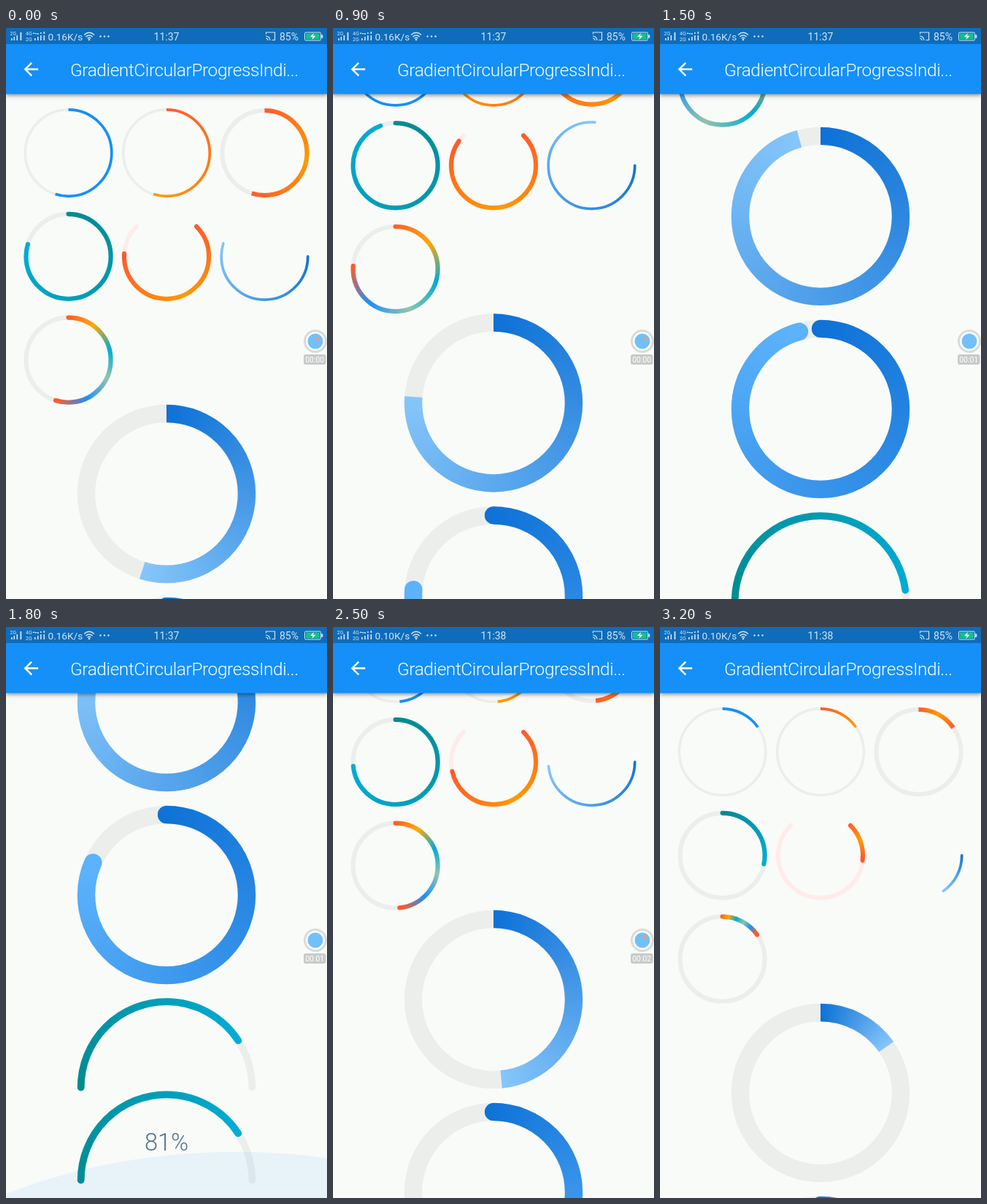
Animation, 440 px wide and 782 px high, one loop 3.3 s. Source, as an HTML page with a canvas:

```html
<!DOCTYPE html>
<html lang="en">
<head>
<meta charset="utf-8">
<title>Gradient circular progress</title>
<style>
  html, body { margin: 0; width: 100%; height: 100%; overflow: hidden; background: #f9fbf9; }
  canvas, svg.ui { position: absolute; left: 0; top: 0; width: 440px; height: 782px; }
  text { font-family: Roboto, sans-serif; }
  .thin { font-weight: 300; }
  #bar { filter: drop-shadow(0 2px 2px rgba(0, 0, 0, .28)) drop-shadow(0 2px 3px rgba(0, 0, 0, .16)); }
</style>
</head>
<body>
<canvas id="stage"></canvas>
<svg class="ui" viewBox="0 0 440 782">
  <text id="percent" class="thin" x="220" text-anchor="middle" font-size="32.6" fill="#4f7489"></text>
  <ellipse id="glow" cx="315" cy="782" fill="#2196f3"/>

  <rect id="bar" width="440" height="90.5" fill="#1490f8"/>
  <rect width="440" height="22" fill="#0e6cba"/>

  <g fill="#d3e5f4" font-size="14">
    <g font-size="7">
      <text x="5.5" y="10">2G</text>
      <text x="27" y="10">4G</text>
      <text x="27" y="17.5">2G</text>
    </g>
    <path d="M7 14h1.6v3H7zM10.5 12h1.6v5h-1.6zM14.5 10h1.6v7h-1.6zM19.5 6h1.8v11h-1.8z"/>
    <path d="M38 6l1.6 2h-3.2zM41 9l1.6-2h-3.2zM39 14h1.6v3H39zM43 12h1.6v5H43zM43 7h1.6v2H43zM47 10h1.6v7H47zM47 6h1.6v2H47zM51.5 10h1.6v7h-1.6zM51.5 5h1.6v3h-1.6z"/>
    <text id="speed" x="57.5" y="17" font-size="13.6"></text>
    <g fill="none" stroke="#d3e5f4" stroke-width="1.4">
      <path d="M107 9.5q7-6.5 14 0M109.3 12q4.7-4.2 9.4 0M111.6 14.3q2.4-2 4.8 0"/>
      <path d="M356.5 8.5V6h12v10.5h-4M356 11a6 6 0 0 1 6 6M356 14a3 3 0 0 1 3 3" stroke-width="1.2"/>
    </g>
    <circle cx="114" cy="16" r="1.3"/>
    <circle cx="129.5" cy="11.5" r="1.2"/>
    <circle cx="135" cy="11.5" r="1.2"/>
    <circle cx="140.5" cy="11.5" r="1.2"/>
    <text id="clock" x="220" y="17" text-anchor="middle"></text>
    <text x="375" y="16.5">85%</text>
    <rect x="409.5" y="6" width="22" height="11" rx="1.5" fill="none" stroke="#d3e5f4"/>
    <rect x="432.3" y="9.3" width="2" height="4.5"/>
    <rect x="411" y="7.5" width="19" height="8" fill="#12c28a"/>
    <path d="M422 7l-5 5h3.5l-1 4 5-5.2h-3.5z" fill="#fff"/>
  </g>

  <path transform="translate(19.7 41.8) scale(1.222)" fill="#fff"
        d="M20 11H7.83l5.59-5.59L12 4l-8 8 8 8 1.41-1.41L7.83 13H20z"/>
  <svg width="440" height="70.5">
    <text class="thin" x="88" y="66.3" font-size="24.4" letter-spacing="-.38" fill="#fff">GradientCircularProgressIndi...</text>
  </svg>

  <g id="recorder">
    <circle cx="424" cy="429" r="14.5" fill="#fbfcfb" stroke="#d8dbd9" stroke-width="3"/>
    <circle cx="424" cy="429" r="10.5" fill="#72c0f9"/>
    <circle id="dot" cx="427.5" cy="425.5" r="2.5" fill="#f59a72"/>
    <rect x="408" y="447" width="30.5" height="14" rx="3" fill="#c8cbc9"/>
    <text id="elapsed" x="423.2" y="457.8" text-anchor="middle" font-size="10.4" fill="#fff"></text>
  </g>
</svg>

<script>
const LOOP = 3300, STEP = 100;
const WIDTH = 440, HEIGHT = 782, DP = WIDTH / 360, TAU = Math.PI * 2;
const MAX_SCROLL = 535;

// [time in ms, value], joined by straight lines
const PROGRESS = [[100, .549], [600, .674], [900, .762], [1300, .972], [1360, 1],
                  [1410, 1], [1800, .816], [3200, .153]];
const GLOW = [[1600, 0], [1800, .72], [1900, .72], [2100, 0]];
// Finger swipes, each slowing down to its end; the second one pulls past the limit
const SWIPES = [
  { start: 600, end: 1300, from: 0, to: 185 },
  { start: 1380, end: 1850, from: 185, to: 623 },
  { start: 2080, end: 2902, from: MAX_SCROLL, to: 0 }
];

const RED = '#ff5a2c', ORANGE = '#ff9a00', TEAL = '#008a8f', CYAN = '#00acd5';
const BLUE = '#1490f8', DEEP = '#0d71d6', SKY = '#86c6fa', GRAY = '#eceeec';

const linear = p => p;
const decelerate = p => 1 - (1 - p) ** 2;

// cubic-bezier(.25, .1, .25, 1)
function ease(x) {
  const curve = (a, b, s) => 3 * a * s * (1 - s) ** 2 + 3 * b * s * s * (1 - s) + s ** 3;
  let low = 0, high = 1;
  for (let i = 0; i < 24; i++) {
    const mid = (low + high) / 2;
    if (curve(.25, .25, mid) < x) low = mid; else high = mid;
  }
  return curve(.1, 1, low);
}

// Positions and sizes in dp; turn and total are fractions of a full turn
const RINGS = [
  { x: 70, y: 140, w: 3, colors: [BLUE, BLUE] },
  { x: 180, y: 140, w: 3, colors: [RED, ORANGE] },
  { x: 290, y: 140, w: 5, colors: [RED, ORANGE, RED] },
  { x: 70, y: 256, w: 5, colors: [TEAL, CYAN], round: true, curve: decelerate },
  { x: 180, y: 256, w: 5, colors: [RED, ORANGE, RED], round: true, curve: ease,
    turn: 1 / 8, total: 3 / 4, back: '#ffecea' },
  { x: 290, y: 256, w: 3, colors: [DEEP, SKY], round: true, turn: 1 / 4, back: null },
  { x: 70, y: 372, w: 5, colors: [RED, '#ffa806', CYAN, '#90c5ac', '#1e90fa', RED], round: true },
  { x: 180, y: 522, r: 100, w: 20, colors: [DEEP, SKY] },
  { x: 180, y: 738, r: 100, w: 20, colors: [DEEP, '#5cb2fb'], round: true },
  { x: 180, y: 953.6, r: 100, w: 8, colors: [TEAL, CYAN], round: true, turn: -1 / 4, total: 1 / 2 },
  { x: 180, y: 1057.6, r: 100, w: 8, colors: [TEAL, CYAN], round: true, turn: -1 / 4, total: 1 / 2 }
];

const $ = id => document.getElementById(id);
const canvas = $('stage'), ctx = canvas.getContext('2d');
const density = window.devicePixelRatio || 1;
canvas.width = WIDTH * density;
canvas.height = HEIGHT * density;

function sample(table, time) {
  const next = table.findIndex(([at]) => at >= time);
  if (next < 0) return table[table.length - 1][1];
  if (next === 0) return table[0][1];
  const [t0, v0] = table[next - 1], [t1, v1] = table[next];
  return v0 + (v1 - v0) * (time - t0) / (t1 - t0);
}

function scrollAt(time) {
  const swipe = SWIPES.filter(({ start }) => start <= time).pop();
  if (!swipe) return 0;
  const { start, end, from, to } = swipe;
  const part = decelerate(Math.min(1, (time - start) / (end - start)));
  return Math.min(MAX_SCROLL, from + (to - from) * part);
}

function drawRing(ring, progress) {
  const { x, y, w, colors, r = 50, turn = 0, total = 1, curve = linear, round = false, back = GRAY } = ring;
  const start = (turn - 1 / 4) * TAU, share = curve(progress) * total;
  // The gradient begins early enough to cover the round start cap
  const lead = round ? Math.asin(w / (2 * r - w)) : 0;
  const arc = (style, part) => {
    ctx.beginPath();
    ctx.arc(x, y, r - w / 2, start, start + part * TAU);
    ctx.strokeStyle = style;
    ctx.stroke();
  };
  ctx.lineWidth = w;
  ctx.lineCap = round ? 'round' : 'butt';
  if (back) arc(back, total);
  const sweep = ctx.createConicGradient(start - lead, x, y);
  colors.forEach((color, i) => sweep.addColorStop(share * i / (colors.length - 1), color));
  arc(sweep, share);
}

// A wide circle below the stage, flattened by the strength of the pull
function drawGlow(size) {
  const radius = WIDTH * 1.5, height = WIDTH * .2;
  const glow = $('glow');
  glow.setAttribute('rx', radius);
  glow.setAttribute('ry', radius * size);
  glow.setAttribute('cy', HEIGHT + (radius - height) * size);
  glow.setAttribute('opacity', .11 * size);
}

function render(time) {
  const progress = sample(PROGRESS, time), scroll = scrollAt(time);

  ctx.setTransform(density, 0, 0, density, 0, 0);
  ctx.fillStyle = '#f9fbf9';
  ctx.fillRect(0, 0, WIDTH, HEIGHT);
  ctx.translate(0, -scroll);
  ctx.scale(DP, DP);
  RINGS.forEach(ring => drawRing(ring, progress));
  drawGlow(sample(GLOW, time));

  $('percent').textContent = Math.floor(progress * 100) + '%';
  $('percent').setAttribute('y', 1252 - scroll);

  const late = time >= 2200;
  const second = [1100, 1900, 2600].filter(at => at <= time).length;
  $('speed').textContent = late ? '0.10K/s' : '0.16K/s';
  $('clock').textContent = late ? '11:38' : '11:37';
  $('elapsed').textContent = '00:0' + second;
  $('dot').setAttribute('opacity', 1 - second % 2);
  $('recorder').setAttribute('opacity', time >= 3200 ? 0 : 1);
}

const begin = performance.now();
function frame() {
  const time = (performance.now() - begin) % LOOP;
  render(Math.floor(time / STEP) * STEP);
  requestAnimationFrame(frame);
}
frame();
</script>
</body>
</html>
```
